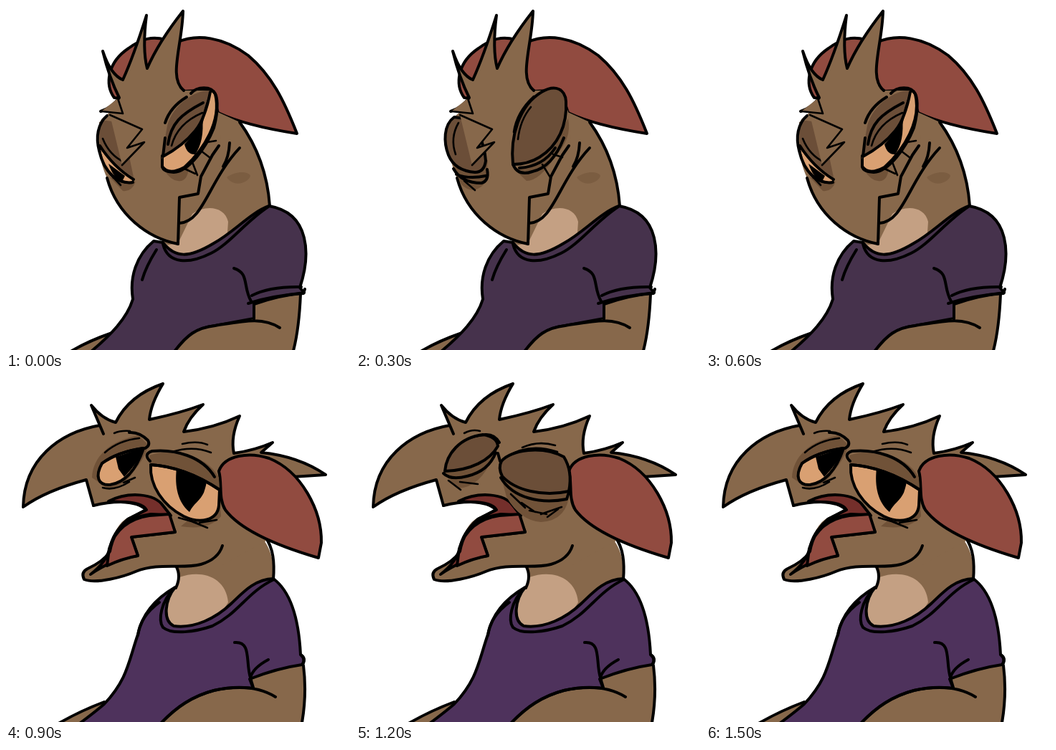
These frames come from a looping animation (480 px wide and 480 px high, 1800 ms). An HTML page:

```html
<!DOCTYPE html>
<html lang="en">
<head>
<meta charset="utf-8">
<title>Blinking creature</title>
<style>
html, body { margin: 0; width: 100%; height: 100%; overflow: hidden; background: #fff; }
svg { display: block; width: 100%; height: 100%; }
path { fill: none; stroke: #000; stroke-width: 4; stroke-linecap: round; stroke-linejoin: round; }
.skin { fill: #87684b; }
.ear { fill: #914b40; }
.mouth { fill: #742f2b; }
.dusk { fill: #46324c; }
.plum { fill: #4e325c; }
.lid { fill: #6b4e38; }
.eye { fill: #d9a072; }
.throat { fill: #c4a083; }
.shade { fill: #705238; }
.flat { stroke: none; }
.black { fill: #000; stroke: none; }
.thin { stroke-width: 2.6; }
</style>
</head>
<body>
<svg viewBox="0 0 480 480">
  <g id="glare">
    <path class="ear" d="M151 128C138 110 141 79 171 59C190 45 205 42 222 47L215 130Z"/>
    <path class="ear" d="M238 51C266 38 303 43 338 69C371 97 388 132 406 178C367 172 328 164 296 149L285 117L250 119C232 110 236 76 238 51Z"/>

    <path class="skin flat" d="M278 140L326 162C350 195 365 236 368 279L335 325L250 352L218 328Z"/>
    <path class="throat flat" d="M260 290C278 277 305 279 310 301L308 330L244 350L222 334L240 331Z"/>
    <path d="M326 162C350 195 365 236 368 279"/>

    <path class="skin" d="M92 481Q116 467 148 456L160 486H84Z"/>
    <path class="skin flat" d="M340 410L410 402Q409 450 401 481H232L275 440L346 430Z"/>
    <path d="M411 402Q409 450 401 481"/>
    <path class="dusk" d="M219 330L206 328C182 348 172 378 177 409C169 436 145 460 120 481L114 486H233L236 481C252 460 265 449 292 446L346 436L346 416Q380 404 416 400L410 393C425 348 425 289 367 279C340 289 319 315 290 331C255 352 236 352 219 330Z"/>
    <path class="skin flat" d="M236 481C252 460 265 449 292 446Q320 443 346 437V481Z"/>
    <path d="M219 332C226 361 256 360 286 345C312 332 334 301 366 280M210 340Q195 364 190 382M318 366C340 373 330 391 342 412M343 404Q368 391 412 392M338 415Q371 404 415 401L417 395"/>
    <path d="M236 481C252 460 265 449 292 446C330 440 358 433 382 449M346 417V436"/>

    <path class="skin flat" d="M135 63Q142 86 163 103Q178 70 196 13Q190 60 197 87Q213 50 247 7C246 55 226 100 248 118L285 118L296 147L300 190L271 240L268 262L242 267L240 332C198 324 155 292 141 240C130 215 123 179 133 158L145 148L132 147Q148 142 158 128Q144 100 135 63Z"/>
    <path d="M240 332C198 324 155 292 141 240M132 147Q148 142 158 128Q144 100 135 63Q146 96 163 103Q178 70 196 13Q190 60 197 87Q213 50 247 7C246 55 226 100 248 118"/>
    <path class="shade flat" opacity=".5" d="M308 239C320 230 338 230 341 237C338 247 318 254 308 239Z"/>
    <path d="M240 332L242 267L268 262L272 238L288 208L297 195M242 303C276 301 282 245 326 198M312 191Q311 211 303 224"/>

    <g id="glareOpen">
      <path class="shade flat" d="M221 229L255 226Q253 246 240 244Q229 243 221 229ZM144 238Q163 249 181 245Q175 260 163 258Z"/>
      <path class="lid flat" d="M130 162Q148 155 164 172L178 239Q149 222 131 194Z"/>
      <path class="eye thin" d="M130 195C133 224 147 248 176 247L178 242Q151 225 130 195Z"/>
      <path class="black" d="M143 220L166 237L162 245Q150 241 143 220Z"/>
      <path d="M141 153C128 164 125 183 130 202C137 233 157 249 177 246M131 195Q150 225 178 242"/>
      <path class="thin" d="M135 185Q144 208 165 218M146 235L160 250M136 221L150 240"/>
      <path class="eye" d="M285 118C298 118 296 148 290 170C279 198 255 231 234 232Q218 231 218 223L218 209L272 165Z"/>
      <path class="lid flat" d="M285 118C266 117 234 135 225 167L217 213Q250 194 270 167Q277 141 285 118Z"/>
      <path class="black" d="M249 193Q264 178 274 156Q277 188 264 207Q253 208 249 193Z"/>
      <path d="M258 122C266 112 287 111 292 123C301 160 276 201 249 225Q227 237 218 224M285 120Q278 157 264 174Q247 195 219 210L222 184M275 135C244 151 230 164 226 193M252 127Q229 141 222 163"/>
      <path class="thin" d="M274 149Q239 164 231 195M260 218L267 236M272 202L285 212M281 190L293 188M247 226L264 234"/>
    </g>
    <g id="glareShut">
      <path class="shade flat" d="M221 228Q260 223 296 157Q302 185 277 211Q256 244 238 244ZM136 224L184 215L181 246Q164 266 147 249Z"/>
      <path class="lid" d="M219 221C215 183 227 139 259 120C279 108 292 117 293 133C295 166 282 195 256 211Q240 221 219 221Z"/>
      <path class="lid" d="M137 155C122 166 122 190 129 208Q138 230 166 232Q179 232 181 216Q178 176 151 157Z"/>
      <path d="M219 221Q226 238 246 231Q274 225 290 184M136 227Q147 247 175 247Q186 244 183 228M228 226Q261 224 278 198M140 235Q158 242 181 237"/>
      <path class="thin" d="M248 126Q224 148 220 176M244 141Q229 159 226 186M143 163Q131 184 139 207M260 221L271 239M275 207L288 211M151 244L166 257"/>
    </g>
    <path class="skin thin" d="M145 152L190 172L169 198L193 190L162 222"/>
    <path class="skin thin" d="M133 147L163 150L156 129"/>
  </g>

  <g id="yawn">
    <path class="skin" d="M75 481Q105 464 137 452L155 486H66Z"/>
    <path class="skin flat" d="M340 414L414 400Q420 440 413 481H216L260 440L345 425Z"/>
    <path d="M415 401Q420 440 413 481"/>
    <path class="skin flat" d="M237 262L350 215C367 232 375 250 373 281L340 310L270 352L224 346L236 291Q244 278 237 262Z"/>
    <path class="throat flat" d="M242 278C272 267 307 277 310 313L290 345L236 351C217 340 220 316 236 295Z"/>
    <path d="M362 222C373 238 375 257 373 281M237 262Q245 276 237 293"/>
    <path class="plum" d="M236 292C210 307 190 329 184 358C171 395 170 420 137 455Q123 467 104 481L98 486H212L217 481C238 459 260 444 290 436Q316 430 345 433L340 420Q378 405 413 400Q419 393 411 386C409 345 400 300 373 280C346 281 330 300 314 315C293 335 263 350 234 346C218 338 222 309 236 292Z"/>
    <path d="M235 293C216 312 212 338 219 348C232 359 265 354 288 346C325 328 336 299 374 281M214 313Q187 333 184 359M319 369C343 367 334 396 341 418Q345 404 366 393M411 386Q419 390 414 400"/>
    <path d="M217 481C238 459 260 444 290 436C326 428 353 431 376 445M341 418L345 432"/>

    <path class="skin flat" d="M24 180C25 114 74 76 131 66L119 38Q134 57 153 62Q172 24 219 8Q202 36 200 58Q243 49 275 37Q255 55 248 75Q290 70 326 53Q313 82 318 105Q347 101 372 90L356 104Q408 109 446 135L400 138L362 228L300 262L237 263C213 259 195 265 181 271C143 285 111 291 107 274Q111 266 126 259L143 244Q151 203 172 194L196 184L186 176L160 173L122 178L112 142Q56 157 24 180Z"/>
    <path class="mouth" d="M143 172C171 158 207 161 219 178L230 192Q200 190 170 197L195 184Q187 174 160 173Z"/>
    <path class="mouth" d="M118 274Q140 257 145 237C152 205 174 194 202 190L226 191L236 215L175 222L184 248Q147 253 118 274Z"/>
    <path class="ear" d="M141 262L144 238C152 212 172 196 200 192L228 190L236 215L175 222L184 248Q162 252 141 262Z"/>
    <path d="M122 178L112 142Q56 157 24 180C25 114 74 76 131 66M136 78L119 38Q134 57 153 62Q172 24 219 8Q202 36 200 58Q243 49 275 37Q255 55 248 75Q290 70 326 53Q313 82 318 105Q347 101 372 90L356 104Q408 109 446 135L400 138"/>
    <path d="M122 178Q142 173 160 173Q190 173 196 184L170 197Q150 214 145 242Q136 256 114 266Q104 271 109 281C126 288 165 277 181 270C213 257 246 267 272 260Q296 253 302 234"/>
    <path class="ear" d="M297 130C305 107 340 103 367 112C412 130 441 185 440 230L436 251C388 237 330 216 306 184C296 168 302 148 297 130Z"/>

    <g id="yawnOpen">
      <path class="shade flat" d="M120 139C121 111 144 87 185 80L199 94Q192 114 180 128Q166 151 143 155ZM200 108C235 96 282 109 297 139L300 193Q284 213 244 207Q261 191 295 181L298 155L203 125Z"/>
      <path class="eye" d="M134 119C124 137 128 150 145 149C166 146 182 127 192 98Q156 103 134 119Z"/>
      <path class="black" d="M153 110L193 97Q184 119 165 138L157 127Z"/>
      <path d="M134 119Q156 103 191 98M172 76Q186 75 198 87Q202 94 194 98"/>
      <path class="thin" d="M138 104Q157 87 186 84M151 77Q160 73 173 74M135 153Q151 158 172 145M164 146L180 139"/>
      <path class="eye" d="M202 121C200 150 219 178 248 193C271 204 295 199 297 178L298 156Q250 124 202 121Z"/>
      <path class="black" d="M238 126C235 152 240 173 256 187C262 175 271 171 276 160Q280 148 280 143Z"/>
      <path d="M202 121Q250 124 298 156M201 116Q191 106 204 102C235 99 274 109 291 138"/>
      <path class="thin" d="M232 103Q261 94 286 104M246 92Q267 87 281 93M241 195L266 202M259 200L281 209M270 202L294 198"/>
    </g>
    <g id="yawnShut">
      <path class="shade flat" d="M122 132L192 108Q174 153 142 154ZM202 136L298 157Q296 199 258 201Q229 199 210 166Z"/>
      <path class="lid" d="M124 130C126 106 145 83 177 79Q197 82 198 95C187 115 160 129 124 130Z"/>
      <path class="lid" d="M203 116C216 100 260 94 290 110C300 126 300 143 297 158C261 166 222 157 204 137Q198 125 203 116Z"/>
      <path d="M122 133Q132 143 155 137Q185 130 195 104M180 79Q193 78 200 90M202 139C219 168 258 176 294 169L299 153M201 116L198 105"/>
      <path class="thin" d="M134 102Q151 82 178 80M151 77Q162 71 173 74M129 143L146 156M145 145L170 148M211 110Q241 90 281 103M232 97Q254 87 278 94M216 162L236 181M231 174L250 187M242 185L266 190M258 190L287 180M267 194L282 183"/>
    </g>
  </g>
</svg>
<script>
const STEP = 300;
const BEATS = 6;
const part = id => document.getElementById(id);
const show = (id, on) => { part(id).style.display = on ? "inline" : "none"; };

function draw(time) {
  const beat = Math.floor(time / STEP) % BEATS;
  const glaring = beat < BEATS / 2;
  const shut = beat % 3 === 1;
  show("glare", glaring);
  show("yawn", !glaring);
  for (const pose of ["glare", "yawn"]) {
    show(pose + "Open", !shut);
    show(pose + "Shut", shut);
  }
}

function tick() {
  draw(performance.now());
  requestAnimationFrame(tick);
}
tick();
</script>
</body>
</html>
```
